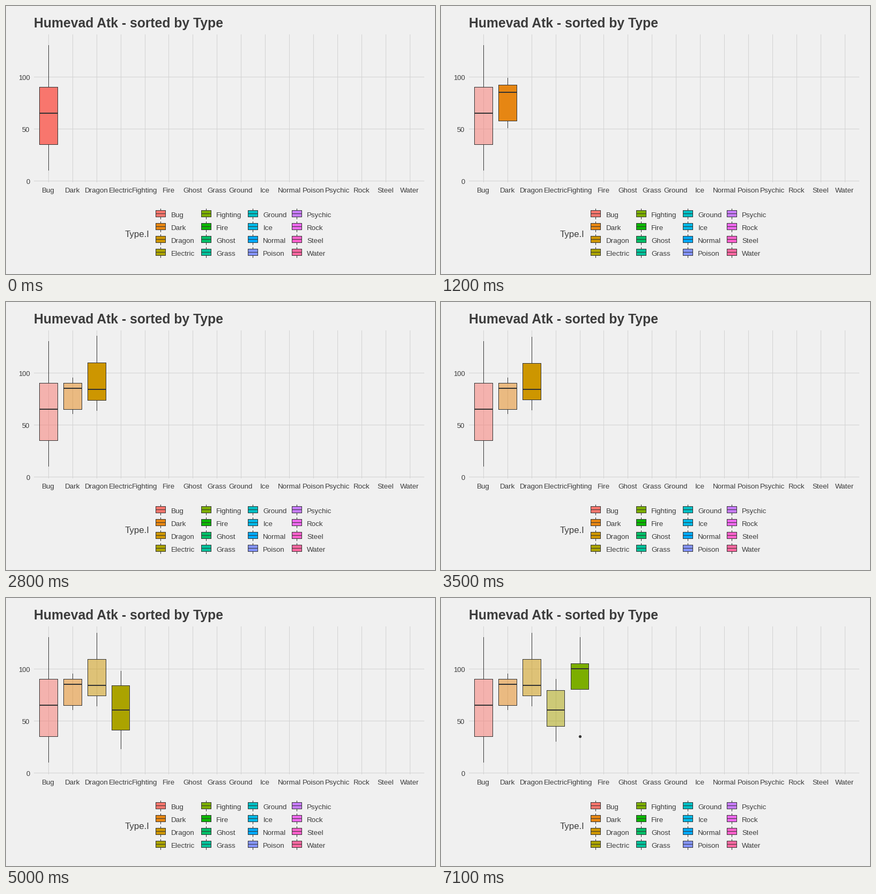
A matplotlib script that plays this animation: 800x500 px, repeating every 8 s.

```python
import math

import matplotlib.pyplot as plt
from matplotlib.animation import FuncAnimation
from matplotlib.patches import Circle, Rectangle

W, H, DPI = 800, 500, 100
BG, GRID, INK, LINE = "#F0F0F0", "#D2D2D2", "#3C3C3C", "#333333"
PANEL = (52, 53, 780, 329)  # left, top, right, bottom
HALF = 16.84                # half width of a box
HOLD, CYCLE = 9, 18         # frames at rest, frames per state
SMALL = 13.4                # label size in pixels

TYPES = {
    "Bug": "#F8766D", "Dark": "#E68613", "Dragon": "#CD9600", "Electric": "#ABA300",
    "Fighting": "#7CAE00", "Fire": "#0CB702", "Ghost": "#00BE67", "Grass": "#00C19A",
    "Ground": "#00BFC4", "Ice": "#00B8E7", "Normal": "#00A9FF", "Poison": "#8494FF",
    "Psychic": "#C77CFF", "Rock": "#ED68ED", "Steel": "#FF61CC", "Water": "#FF68A1",
}
NAMES, FILLS = list(TYPES), list(TYPES.values())

# low whisker, lower hinge, median, upper hinge, high whisker
STATS = [
    (10, 35, 65, 90, 130),
    (60, 65, 85, 90, 95),
    (64, 74, 84, 109, 134),
    (30, 45, 60, 79, 90),
    (80, 80, 100, 105, 130),
]
OUTLIERS = {4: 35}

plt.rcParams["font.family"] = "Liberation Sans"
fig = plt.figure(figsize=(W / DPI, H / DPI), dpi=DPI, facecolor=BG)
ax = fig.add_axes([0, 0, 1, 1])
ax.set_xlim(0, W)
ax.set_ylim(H, 0)
ax.axis("off")


def x_pos(i):
    return 79.42 + 44.908 * i


def y_pos(v):
    return 326.7 - 1.9465 * v


def bar(x0, y0, x1, y1, color, alpha=1):
    """Fill whole pixels, clipped to the top of the panel."""
    y0, y1 = max(y0, PANEL[1]), max(y1, PANEL[1])
    patch = Rectangle((x0, y0), x1 - x0, y1 - y0, fc=color, lw=0,
                      alpha=alpha, antialiased=False)
    return ax.add_patch(patch)


def frame_box(x0, y0, x1, y1, fill, fill_alpha=1, line_alpha=1):
    """Filled rectangle with a one pixel outline; x1 and y1 are inclusive."""
    return [
        bar(x0, y0, x1 + 1, y1 + 1, fill, fill_alpha),
        bar(x0, y0, x1 + 1, y0 + 1, LINE, line_alpha),
        bar(x0, y1, x1 + 1, y1 + 1, LINE, line_alpha),
        bar(x0, y0 + 1, x0 + 1, y1, LINE, line_alpha),
        bar(x1, y0 + 1, x1 + 1, y1, LINE, line_alpha),
    ]


def label(x, y, text, px, ha="left", **kw):
    ax.text(x, y, text, fontsize=px * 72 / DPI, color=INK, ha=ha, va="baseline", **kw)


def draw_grid():
    left, top, right, bottom = PANEL
    for v in (0, 50, 100):
        y = math.floor(y_pos(v))
        bar(left, y, right, y + 1, GRID)
        label(44.4, y + 6, str(v), 13, "right")
    for i, name in enumerate(NAMES):
        x = math.floor(x_pos(i))
        bar(x, top, x + 1, bottom, GRID)
        label(x, 348, name, SMALL, "center")


def draw_legend():
    label(221.5, 431, "Type.I", 16.8)
    columns = [(279, 308), (364, 392.3), (451, 479.3), (533, 561.3)]
    for i, (name, fill) in enumerate(TYPES.items()):
        x, tx = columns[i // 4]
        y = 387 + 24 * (i % 4)
        bar(x + 9, y - 9, x + 10, y - 6, LINE)
        bar(x + 9, y + 7, x + 10, y + 11, LINE)
        frame_box(x, y - 6, x + 18, y + 6, fill)
        bar(x, y, x + 19, y + 1, LINE)
        label(tx, y + 7.2, name, SMALL)


def draw_box(i, scale=1, fill_alpha=1, line_alpha=1):
    med = STATS[i][2]
    low, q1, mid, q3, high = (math.floor(y_pos(med + (v - med) * scale)) for v in STATS[i])
    x = math.floor(x_pos(i))
    x0, x1 = math.floor(x_pos(i) - HALF), math.floor(x_pos(i) + HALF)
    parts = []
    if i in OUTLIERS:
        dot = Circle((x + 0.5, y_pos(OUTLIERS[i])), 2.6, fc=LINE, lw=0, alpha=line_alpha)
        parts.append(ax.add_patch(dot))
    parts.append(bar(x, high, x + 1, q3, LINE, line_alpha))
    parts.append(bar(x, q1, x + 1, low, LINE, line_alpha))
    parts += frame_box(x0, q3, x1, q1, FILLS[i], fill_alpha, line_alpha)
    parts.append(bar(x0, mid - 1, x1 + 1, mid + 1, LINE, line_alpha))
    return parts


def back_out(p):
    f = 1 - p
    return 1 - (f ** 3 - f * math.sin(f * math.pi))


live = []


def reset():
    while live:
        live.pop().remove()
    return []


def update(n):
    reset()
    state, step = divmod(n, CYCLE)
    ease = 1
    fade = 0
    if step >= HOLD:
        state += 1
        ease = back_out((step - HOLD + 1) / HOLD)
        fade = max(0, 1 - ease)
    for i in range(state):
        live.extend(draw_box(i, fill_alpha=0.5))
    if fade > 1e-6:
        live.extend(draw_box(state - 1, fill_alpha=fade, line_alpha=fade))
    live.extend(draw_box(state, scale=ease))
    return live


label(52.3, 40, "Humevad Atk - sorted by Type", 24.75, weight="bold")
draw_grid()
draw_legend()

anim = FuncAnimation(fig, update, frames=80, init_func=reset, interval=100,
                     repeat=True, repeat_delay=0, blit=False)
plt.show()
```
